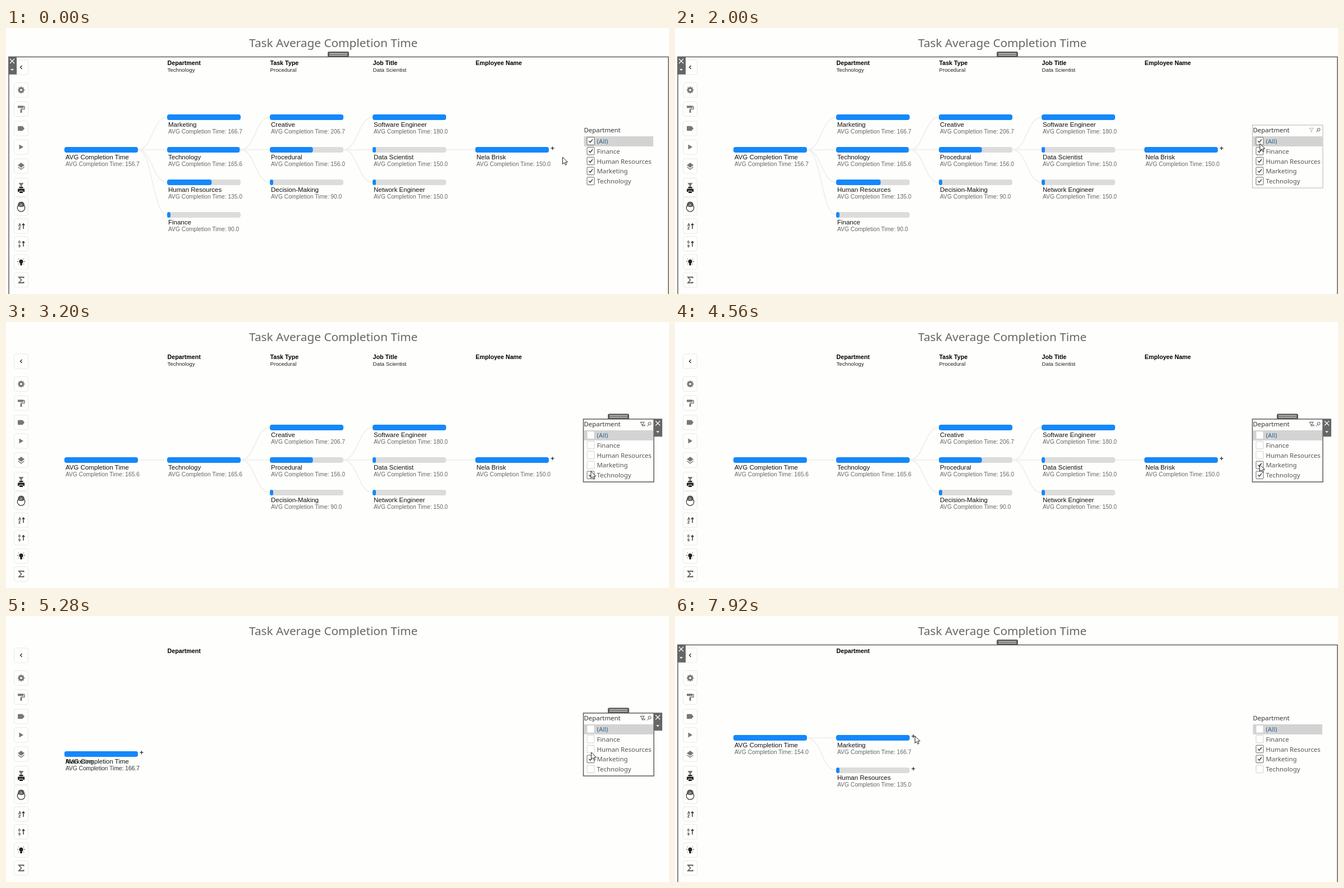
Write an HTML page that moves like this. It is 1181 px wide and 474 px high and loops after 8000 ms.

```html
<!DOCTYPE html>
<html lang="en">
<head>
<meta charset="utf-8">
<title>Task Average Completion Time</title>
<style>
  html, body { margin: 0; width: 100%; height: 100%; overflow: hidden; background: #fefefc; }
  svg { display: block; width: 1181px; height: 474px; }
  text { font-family: "Liberation Sans", Arial, sans-serif; }
  .title { font: 20.8px "Noto Sans", sans-serif; fill: #666; }
  .list text { font: 11.4px "Noto Sans", sans-serif; fill: #555; }
  .list .cap { fill: #333; }
  .list .all { fill: #35658f; }
  .head { font-size: 10.7px; font-weight: bold; fill: #000; }
  .pick { font-size: 9.7px; fill: #222; }
  .name { font-size: 11.5px; fill: #111; }
  .val { font-size: 10.25px; fill: #666; }
  .link { fill: none; stroke: #f0f0f0; stroke-width: 2; }
  .btn { fill: #fefefc; stroke: #e9e9e9; }
  .order { font-size: 7px; font-weight: bold; fill: #333; }
  .line { fill: none; stroke: #333; stroke-width: 1.4; }
</style>
</head>
<body>
<svg viewBox="0 0 1181 474">
  <text class="title" x="433" y="33.5">Task Average Completion Time</text>
  <g id="tools"></g>
  <g id="tree"></g>
  <g id="frame"></g>
  <g id="list" class="list"></g>
  <path id="cursor" d="M0 0V12.5L3 9.8L5 14.2L7 13.3L5.1 9H9Z" fill="#fff" stroke="#222" stroke-width="1"/>
</svg>
<script>
const LOOP = 8000, STEP = 80, GROW = 500;
const COL = 183, ROW = 58, LEFT = 104, MID = 246, BAR = 131;
const DARK = '#5c5c5c';
const put = (id, html) => { document.getElementById(id).innerHTML = html; };

// Tool strip: icons are drawn around their own centre
const gear = Array.from({ length: 8 }, (_, i) =>
  `<rect x="-1.3" y="-6" width="2.6" height="4" transform="rotate(${i * 45})"/>`).join('') +
  '<circle r="3.3" fill="none" stroke="#777" stroke-width="2.4"/>';
const order = (a, b) =>
  `<text class="order" x="-5" y="-.3">${a}</text><text class="order" x="-5" y="6">${b}</text>
   <path class="line" d="M4 5V-4M1.8 -1.8L4 -4.3L6.2 -1.8"/>`;
const icons = [
  [70, '<path class="line" d="M1.5 -3L-1.5 0L1.5 3" stroke-width="1.6"/>'],
  [110.5, gear],
  [144.5, '<path d="M-6 -6H4V-2H-6Z"/><path d="M4 -4.5H6V0H0V2" fill="none" stroke="#777" stroke-width="1.4"/><rect x="-1.5" y="1" width="3" height="5.5"/>'],
  [179, '<path d="M-5 -4.3H2.5L6 0L2.5 4.3H-5Q-6 4.3 -6 3.3V-3.3Q-6 -4.3 -5 -4.3Z"/>'],
  [212, '<path d="M-3.5 -4.5L4 0L-3.5 4.5Z"/>'],
  [246, '<path d="M0 -6L6 -1.5L0 3L-6 -1.5Z"/><path d="M-5.5 1.8L0 5.8L5.5 1.8" fill="none" stroke="#777" stroke-width="1.4"/>'],
  [284, '<path d="M-4.5 -8H4.5L1 -3V0H-1V-3Z"/><g fill="#222"><rect x="-3.5" y="-1" width="7" height="2.5"/><path d="M-6 2.5H6V8H3.5V6H-3.5V8H-6Z"/><rect x="-3" y="7" width="6" height="3"/></g>', 33],
  [318, '<circle cy="2.5" r="6.7" fill="#fff" stroke="#333" stroke-width="1.2"/><path d="M-6 -1Q-6 -9 0 -8.5Q6 -9 6 -1Q0 3 -6 -1Z" fill="#555"/><path d="M-2 -5L2 -3M-3 -2H2" stroke="#ccc"/>', 32],
  [353, order('A', 'Z')],
  [384.5, order('0', '9')],
  [417, '<g fill="#222"><circle cy="-1" r="3.6"/><rect x="-1.7" y="2" width="3.4" height="4"/></g><path d="M-7 -1H-5M5 -1H7M-5 -6L-4 -5M5 -6L4 -5M-5 4L-4 3M5 4L4 3" stroke="#333"/>'],
  [449, '<path d="M4.5 -3V-5H-4L.5 0L-4 5H4.5V3" fill="none" stroke="#666" stroke-width="1.8"/>'],
];
put('tools', icons.map(([y, art, h = 26]) =>
  `<g transform="translate(27 ${y})" fill="#777"><rect class="btn" x="-12.5" y="${-h / 2}" width="25" height="${h}" rx="3"/>${art}</g>`).join(''));

// Tree states: each column is [picked row, [name, value]...]
const heads = ['Department', 'Task Type', 'Job Title', 'Employee Name'];
const market = ['Marketing', 166.7], tech = ['Technology', 165.6], people = ['Human Resources', 135];
const deeper = [
  [1, ['Creative', 206.7], ['Procedural', 156], ['Decision-Making', 90]],
  [1, ['Software Engineer', 180], ['Data Scientist', 150], ['Network Engineer', 150]],
  [0, ['Nela Brisk', 150]],
];
const root = v => [0, ['AVG Completion Time', v]];
const states = [
  { at: -GROW, cols: [root(156.7), [1, market, tech, people, ['Finance', 90]], ...deeper] },
  { at: 2680, cols: [root(165.6), [0, tech], ...deeper] },
  { at: 4620, cols: [root(166), [1, market, tech], ...deeper] },
  { at: 5280, cols: [root(166.7), [0, market]] },
  { at: 6240, cols: [root(154), [0, market, people]] },
];
for (const s of states) {
  const up = Math.max(...s.cols.map(c => c[0]));
  const down = Math.max(...s.cols.map(c => c.length - 2 - c[0]));
  s.base = MID - (down - up) * ROW / 2;
}

const ease = p => p < .5 ? 4 * p ** 3 : 1 - (2 - 2 * p) ** 3 / 2;
const clamp = p => Math.min(1, Math.max(0, p));
const mix = (a, b, p) => a + (b - a) * p;

function node(x, y, [name, value], part, plus) {
  const w = 6 + part * (BAR - 6);
  return `<rect x="${x}" y="${y - 5}" width="${BAR}" height="10" rx="4" fill="#dcdcdc"/>
    <rect x="${x}" y="${y - 5}" width="${w}" height="10" rx="${Math.min(4, w / 2)}" fill="#1488fb"/>
    <text class="name" x="${x + 2}" y="${y + 17}">${name}</text>
    <text class="val" x="${x + 2}" y="${y + 29.3}">AVG Completion Time: ${value.toFixed(1)}</text>` +
    (plus ? `<path d="M${x + 134.5} ${y - 2.8}h6m-3 -3v6" stroke="#222" stroke-width="1.2"/>` : '');
}

function drawTree(t) {
  const k = states.findLastIndex(s => s.at <= t);
  const { at, cols, base } = states[k];
  const from = k ? states[k - 1].base : base;
  const p = ease(clamp((t - at) / GROW));
  const rootY = mix(from, base, p);
  let links = '', nodes = '', labels = '';
  cols.forEach(([pick, ...rows], c) => {
    const x = mix(LEFT, LEFT + c * COL, p);
    const vals = rows.map(r => r[1]), lo = Math.min(...vals), hi = Math.max(...vals);
    const last = c === cols.length - 1;
    rows.forEach((row, i) => {
      const y = mix(from, base + (i - pick) * ROW, p);
      if (c) {
        const px = mix(LEFT, LEFT + (c - 1) * COL, p) + BAR, m = (px + x) / 2;
        links += `<path class="link" d="M${px} ${rootY}C${m} ${rootY} ${m} ${y} ${x} ${y}"/>`;
      }
      nodes += node(x, y, row, hi > lo ? (row[1] - lo) / (hi - lo) : 1, last);
    });
    if (c) {
      const hx = LEFT + c * COL + .5;
      labels += `<text class="head" x="${hx}" y="66">${heads[c - 1]}</text>`;
      if (!last) labels += `<text class="pick" x="${hx}" y="77.5">${rows[pick][0]}</text>`;
    }
  });
  put('tree', links + nodes + labels);
}

// Selection chrome: outline, grip on top and a tab at the side
function chrome(x, y, w, h, grip, tab) {
  const tx = tab + 7;
  return `<rect x="${x}" y="${y}" width="${w}" height="${h}" fill="none" stroke="${DARK}" stroke-width="1.5"/>
    <path d="M${grip} ${y}v-7q0 -2.5 2.5 -2.5h33q2.5 0 2.5 2.5v7Z" fill="${DARK}"/>
    <path d="M${grip + 3} ${y - 6.2}h32m-32 3h32" stroke="#fff"/>
    <rect x="${tab}" y="${y - .7}" width="15" height="32" fill="#666"/>
    <path d="M${tx - 4} ${y + 3.5}l8 8m0 -8l-8 8" stroke="#fff" stroke-width="1.2"/>
    <path d="M${tx - 3} ${y + 21.5}h6l-3 3Z" fill="#fff"/>`;
}
const outline = (x, y, w, h) =>
  `<rect x="${x}" y="${y}" width="${w}" height="${h}" fill="none" stroke="#b5b5b5"/>`;

const rows = ['(All)', 'Finance', 'Human Resources', 'Marketing', 'Technology'];
const checks = [[0, 'AFHMT'], [2080, ''], [2640, 'T'], [4400, 'MT'], [5040, 'M'], [6080, 'HM']];

function drawList(t) {
  const on = checks.findLast(c => c[0] <= t)[1];
  const active = t >= 2080 && t < 7840;
  const hover = t >= 1600 && t < 6720;
  let out = '<rect x="1029.5" y="193" width="123.5" height="18" fill="#d3d3d3"/>' +
    '<text class="cap" x="1029.5" y="186">Department</text>';
  rows.forEach((name, i) => {
    const y = 201.7 + i * 17.8, ticked = on.includes('AFHMT'[i]);
    out += `<rect x="1035" y="${y - 7}" width="13" height="13.5" rx="1" fill="#fff" stroke="${ticked ? '#666' : '#d0d0d0'}"/>`;
    if (ticked) out += `<path class="line" d="M1038.3 ${y - .5}l2.4 2.6l4.3 -5.4" stroke-width="1.3"/>`;
    out += `<text class="${i ? '' : 'all'}" x="1052.5" y="${y + 4.3}">${name}</text>`;
  });
  if (hover || active) {
    out += `<path d="M1130 178.500h7l-2.700 3.500v3.500l-1.600 -1v-2.500Z" fill="none" stroke="${active ? '#555' : '#bbb'}"/>
      <circle cx="1146.500" cy="181" r="2.500" fill="none" stroke="#555"/><path d="M1144.700 183l-2.500 2.800" stroke="#555"/>`;
    if (active) out += '<path d="M1135.500 182.500l3.300 3.300m0 -3.300l-3.300 3.300" stroke="#555"/>';
  }
  if (active) out += chrome(1028.5, 173, 125.5, 112, 1072, 1154);
  else if (hover) out += outline(1028.5, 173, 125.5, 112);
  put('list', out);
}

function drawFrame(t) {
  const active = t < 2080 || t >= 7840;
  put('frame', active ? chrome(5, 51.5, 1175, 440, 573, 4)
    : t >= 6960 ? outline(5, 51.5, 1175, 440) : '');
}

const moves = [
  [0, 991.5, 230], [880, 991.5, 230], [1760, 1042, 206], [2160, 1042, 206],
  [2560, 1042, 270], [3040, 1042, 270], [3440, 1041.5, 254], [4560, 1041.5, 254],
  [4880, 1042, 271], [5080, 1042, 271], [5280, 1042.5, 243], [5440, 1042.5, 238],
  [6560, 1042.5, 238], [7680, 427.5, 214], [8000, 427.5, 214],
];
function drawCursor(t) {
  const i = moves.findLastIndex(m => m[0] <= t);
  const [t0, x0, y0] = moves[i], [t1, x1, y1] = moves[i + 1];
  const p = ease((t - t0) / (t1 - t0));
  document.getElementById('cursor').setAttribute('transform', `translate(${mix(x0, x1, p)} ${mix(y0, y1, p)})`);
}

const start = performance.now();
let shown = -1;
function tick() {
  const now = (performance.now() - start) % LOOP;
  const t = Math.floor(now / STEP) * STEP;
  if (t !== shown) {
    shown = t;
    drawTree(t);
    drawFrame(t);
    drawList(t);
    drawCursor(t);
  }
  requestAnimationFrame(tick);
}
tick();
</script>
</body>
</html>
```
